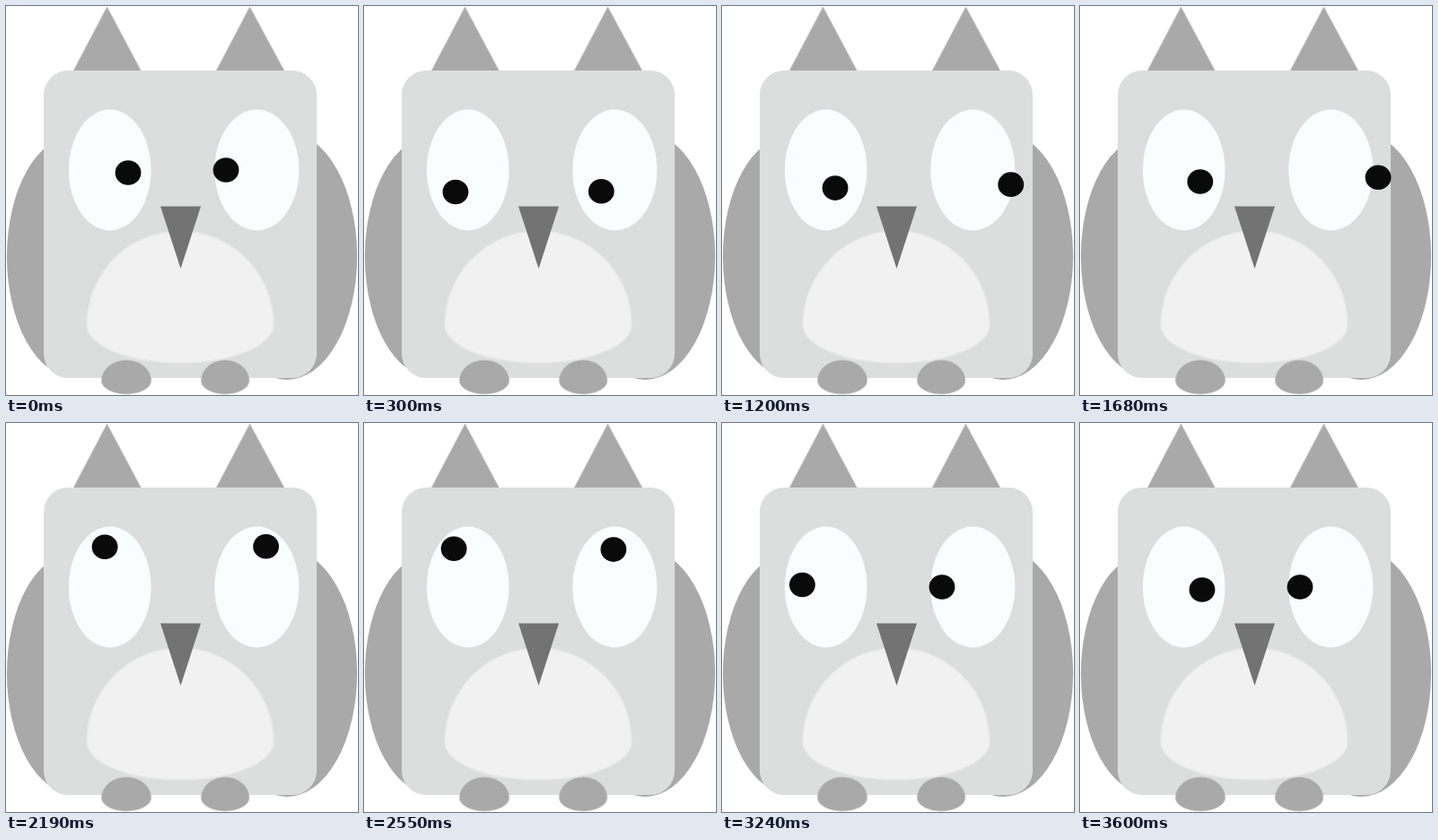
An HTML page that plays this animation: 392 by 434 pixels, repeating every 3630 ms.

```html
<!DOCTYPE html>
<html lang="en">
<head>
<meta charset="utf-8">
<title>Owl rolling its eyes</title>
<style>
html, body { margin: 0; width: 100%; height: 100%; overflow: hidden; background: #fff; }
svg { display: block; }
</style>
</head>
<body>
<svg width="392" height="434" viewBox="0 0 392 434">
  <g fill="#a9a9a9">
    <ellipse cx="75" cy="279.5" rx="74" ry="134"/>
    <ellipse cx="313" cy="279" rx="78" ry="138"/>
    <g stroke="#c8c8c8">
      <path d="M112.5 1L75 72.5H150.5Z"/>
      <path d="M271.5 1L234 72.5H310Z"/>
    </g>
  </g>
  <rect x="42" y="72" width="304" height="343" rx="27" fill="#dcdedd"/>
  <g fill="#f9fdff">
    <ellipse cx="115.7" cy="183" rx="45.8" ry="67.5"/>
    <ellipse cx="279.3" cy="183" rx="47" ry="67.5"/>
  </g>
  <path d="M90 356A104 105 0 0 1 298 356A104 42 0 0 1 90 356Z" fill="#f1f1f1" stroke="#e8e8e8" stroke-width="1.5"/>
  <path d="M172 223.5H217L194.5 293Z" fill="#737373"/>
  <g fill="#a9a9a9" stroke="#c4c4c4" stroke-width=".7">
    <path d="M106.3 418A27.7 23 0 0 1 161.7 418A27.7 15 0 0 1 106.3 418Z"/>
    <path d="M217.3 418A26.8 23 0 0 1 270.9 418A26.8 15 0 0 1 217.3 418Z"/>
  </g>
  <g fill="#0a0a0a">
    <ellipse id="left" rx="14.4" ry="13.8"/>
    <ellipse id="right" rx="14.4" ry="13.8"/>
  </g>
</svg>
<script>
const LOOP = 3630;
const left = document.getElementById('left');
const right = document.getElementById('right');

// time in ms, left pupil x and y, right pupil x and y
const keys = [
  [0, 136, 186, 245, 183],
  [465, 90, 215, 271, 215],
  [1540, 135.5, 200, 335, 195],
  [2365, 107.5, 132, 285, 132],
  [3000, 66, 177.8, 245, 183],
  [3600, 136, 186, 245, 183]
];

// cubic-bezier(.42, 0, .58, 1)
function easeInOut(x) {
  let low = 0, high = 1;
  for (let i = 0; i < 20; i++) {
    const u = (low + high) / 2;
    const bx = 1.26 * u * (1 - u) ** 2 + 1.74 * u * u * (1 - u) + u ** 3;
    if (bx < x) low = u; else high = u;
  }
  return low * low * (3 - 2 * low);
}

function place(pupil, x, y) {
  pupil.setAttribute('cx', x);
  pupil.setAttribute('cy', y);
}

function draw() {
  const t = Math.min(performance.now() % LOOP, 3600);
  const next = keys.findIndex(key => key[0] > t);
  const to = keys[next < 0 ? keys.length - 1 : next];
  const from = keys[keys.indexOf(to) - 1];
  const k = easeInOut((t - from[0]) / (to[0] - from[0]));
  const [, lx, ly, rx, ry] = from.map((v, i) => v + (to[i] - v) * k);
  place(left, lx, ly);
  place(right, rx, ry);
  requestAnimationFrame(draw);
}
draw();
</script>
</body>
</html>
```
